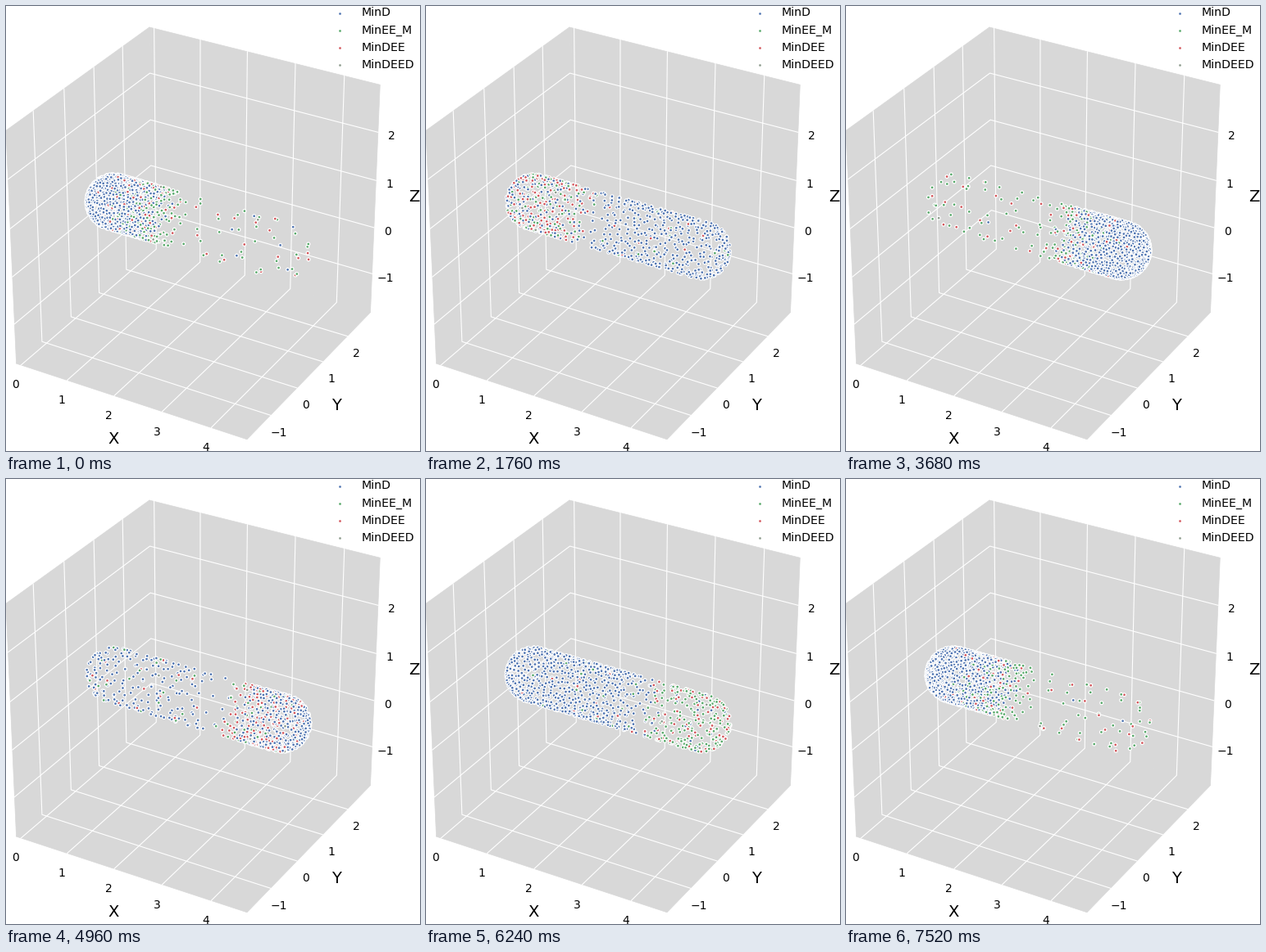
These frames come from a looping animation (505 px wide and 544 px high, 7.68 s). A matplotlib script:

```python
import numpy as np
import matplotlib.pyplot as plt
from matplotlib.animation import FuncAnimation

W, H, DPI = 505, 544, 100
FRAMES, INTERVAL = 48, 160
plt.rcParams["font.family"] = "DejaVu Sans"

# Axis box: equal spans seen from elevation 30, azimuth -60
SPAN = 4.82
MID = np.array([2.307, 0.553, 0.553])
LO, HI = MID - SPAN / 2, MID + SPAN / 2
COS, SIN = np.sqrt(3) / 2, 0.5

# Rod-shaped cell
LENGTH, RADIUS = 4.52, 0.508
PLASTIC = 1.32471795724  # steps of an evenly spread 2D sequence

SPECIES = {
    "MinD": "#4c72b0",
    "MinEE_M": "#55a868",
    "MinDEE": "#d3545a",
    "MinDEED": "#8c9a8c",
}
COLORS = np.array(list(SPECIES.values()))


def project(x, y, z):
    """Perspective view: pixel x, pixel y and nearness."""
    bx, by, bz = (1.10025 / SPAN * (np.asarray(p) - m)
                  for p, m in zip((x, y, z), MID))
    across = COS * bx + SIN * by
    toward = SIN * bx - COS * by
    up = COS * bz - SIN * toward
    near = COS * toward + SIN * bz
    scale = 2952 / (10 - near)
    return 232.2 + across * scale, 268.4 - up * scale, near


def wave(phase, peak, power):
    """Pulse from 0 to 1 that repeats every 2 units of phase."""
    return (0.5 + 0.5 * np.cos(np.pi * (phase - peak))) ** power


def pole_bands(phase):
    """Count, start and end of each species' band, measured from the pole.

    Phase 0: packed cap; about 0.3: it dissolves; 1: empty; then it refills.
    """
    edge = np.interp(phase, [0, 0.35, 0.65, 1, 1.6, 2],
                     [1.1, 1.0, 1.25, 2.1, 2.4, 1.1])
    ring = wave(phase, 0, 2)
    mind = 880 * wave(phase, 1.85, 1.7)
    minee = 18 + 115 * wave(phase, 0, 8) + 170 * wave(phase, 0.65, 8)
    mindee = 16 + 160 * wave(phase, 0.3, 4)
    red_band = (edge - 0.5) * ring, edge + 0.4 * ring
    return [
        (mind, 0, edge),
        (minee, (edge - 0.25) * ring, edge + 0.55 * ring),
        (mindee, *red_band),
        (0.04 * mindee, *red_band),
    ]


def scatter_band(rng, n, start, end):
    """Axial distances and angles, evenly spread with soft band ends."""
    i = np.arange(int(round(n)))
    u = np.clip((rng.random() + i / PLASTIC) % 1, 0.002, 0.998)
    angle = 2 * np.pi * (rng.random() + i / PLASTIC ** 2)
    s = start + (end - start) * (u + 0.05 * np.log(u / (1 - u)))
    s = np.abs(s + rng.normal(0, 0.02, len(i)))
    return s, angle + rng.normal(0, 0.05, len(i))


def molecules(step):
    """Pixel positions and colours, far ones first."""
    rng = np.random.default_rng(900 + step)
    dist, angle, kind = [], [], []
    for right in (False, True):
        phase = (step / (FRAMES / 2) + right) % 2
        for k, band in enumerate(pole_bands(phase)):
            s, a = scatter_band(rng, *band)
            dist.append(LENGTH - s if right else s)
            angle.append(a)
            kind.append(np.full(len(s), k))
    s, a, kind = map(np.concatenate, (dist, angle, kind))
    cap = np.clip(RADIUS - np.minimum(s, LENGTH - s), 0, RADIUS)
    r = np.sqrt(RADIUS ** 2 - cap ** 2)
    px, py, near = project(MID[0] - LENGTH / 2 + s,
                           MID[1] + r * np.cos(a), MID[2] + r * np.sin(a))
    order = np.argsort(near)
    return np.column_stack([px, py])[order], COLORS[kind[order]]


fig = plt.figure(figsize=(W / DPI, H / DPI), dpi=DPI, facecolor="white")
ax = fig.add_axes([0, 0, 1, 1])
ax.set(xlim=(0, W), ylim=(H, 0))
ax.axis("off")


def path(*points):
    px, py, _ = project(*np.array(points, float).T)
    return px, py


def label(x, y, text, size=10):
    ax.text(x, y + size * 0.47, text, size=size, ha="center", va="baseline")


(x0, y0, z0), (x1, y1, z1) = LO, HI
panes = [
    [(x0, y0, z0), (x0, y1, z0), (x0, y1, z1), (x0, y0, z1)],
    [(x0, y1, z0), (x1, y1, z0), (x1, y1, z1), (x0, y1, z1)],
    [(x0, y0, z0), (x1, y0, z0), (x1, y1, z0), (x0, y1, z0)],
]
for pane in panes:
    ax.fill(*path(*pane), fc="#d8d8d8", ec="#d8d8d8", lw=0.5)

lines = [[(x, y0, z0), (x, y1, z0), (x, y1, z1)] for x in range(5)]
lines += [[(x0, y, z1), (x0, y, z0), (x1, y, z0)] for y in range(-1, 3)]
lines += [[(x0, y0, z), (x0, y1, z), (x1, y1, z)] for z in range(-1, 3)]
for line in lines:
    ax.plot(*path(*line), color="white", lw=0.8)

# Tick labels bend slightly with the perspective
for i in range(5):
    label(12 + 55.4 * i + 0.65 * i * i, 462.7 + 18.8 * i + 0.1 * i * i, str(i))
for i, text in enumerate(("\u22121", "0", "1", "2")):
    label(333 + 33 * i - 0.55 * i * i, 521 - 34 * i + 0.55 * i * i, text)
    label(462.5 + 3.1 * i - 0.2 * i * i, 332 - 56.5 * i - 0.5 * i * i, text)
label(131.5, 528.5, "X", 14)
label(403, 487.5, "Y", 14)
label(497.5, 232.3, "Z", 14)

style = dict(s=8, linewidths=0.9, edgecolors="white")
for i, (name, color) in enumerate(SPECIES.items()):
    y = 8.5 + 21.3 * i
    ax.scatter([407], [y], color=color, **style)
    ax.text(433.8, y + 3.8, name, size=10.2, va="baseline")
dots = ax.scatter([], [], zorder=3, **style)


def update(step):
    xy, colors = molecules(step)
    dots.set_offsets(xy)
    dots.set_facecolor(colors)
    return [dots]


anim = FuncAnimation(fig, update, frames=FRAMES, interval=INTERVAL,
                     repeat=True, repeat_delay=0)
plt.show()
```
